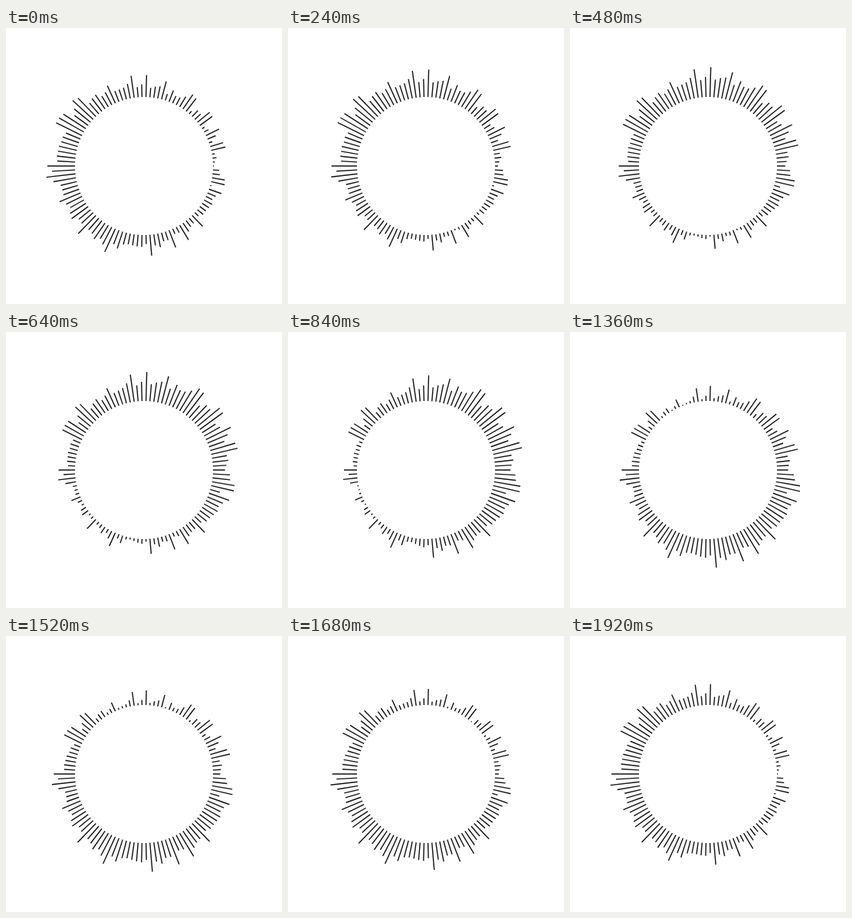
Animation of 360 by 360 pixels, one loop 1.96 s. Source, as an HTML page with a canvas:

```html
<!DOCTYPE html>
<html lang="en">
<head>
<meta charset="utf-8">
<title>Radial wave</title>
<style>
html, body { margin: 0; width: 100%; height: 100%; overflow: hidden; background: #fff; }
canvas { display: block; width: 360px; height: 360px; }
</style>
</head>
<body>
<canvas id="stage"></canvas>
<script>
const LOOP = 1960, STEP = 40;
const COUNT = 110, RADIUS = 90, SWING = 10;

// Positions of the tall rays, clockwise from the left
const tall = new Set([
  0, 8, 9, 10, 13, 14, 25, 28, 32, 38, 39, 43, 44, 47,
  50, 51, 58, 59, 61, 69, 73, 76, 81, 90, 96, 108
]);

function seededRandom(seed) {
  return () => (seed = seed * 16807 % 2147483647) / 2147483647;
}

const random = seededRandom(2024);
const rays = Array.from({ length: COUNT }, (_, i) => {
  const angle = 2 * Math.PI * i / COUNT;
  const base = tall.has(i) ? 16 + 3 * random() : 1 + 10 * random();
  return { angle, base };
});

const canvas = document.getElementById("stage");
const ctx = canvas.getContext("2d");
const scale = window.devicePixelRatio || 1;
canvas.width = canvas.height = 360 * scale;

function draw(now) {
  const time = Math.floor((now % LOOP) / STEP) * STEP;
  const crest = 2 * Math.PI * time / LOOP;
  ctx.setTransform(scale, 0, 0, scale, 0, 0);
  ctx.clearRect(0, 0, 360, 360);
  ctx.translate(180, 180);
  ctx.strokeStyle = "#111";
  ctx.lineWidth = 1.4;
  ctx.beginPath();
  for (const { angle, base } of rays) {
    const end = RADIUS + base + SWING * (1 + Math.cos(crest - angle));
    const x = -Math.cos(angle), y = -Math.sin(angle);
    ctx.moveTo(RADIUS * x, RADIUS * y);
    ctx.lineTo(end * x, end * y);
  }
  ctx.stroke();
}

function tick() {
  draw(performance.now());
  requestAnimationFrame(tick);
}
tick();
</script>
</body>
</html>
```
